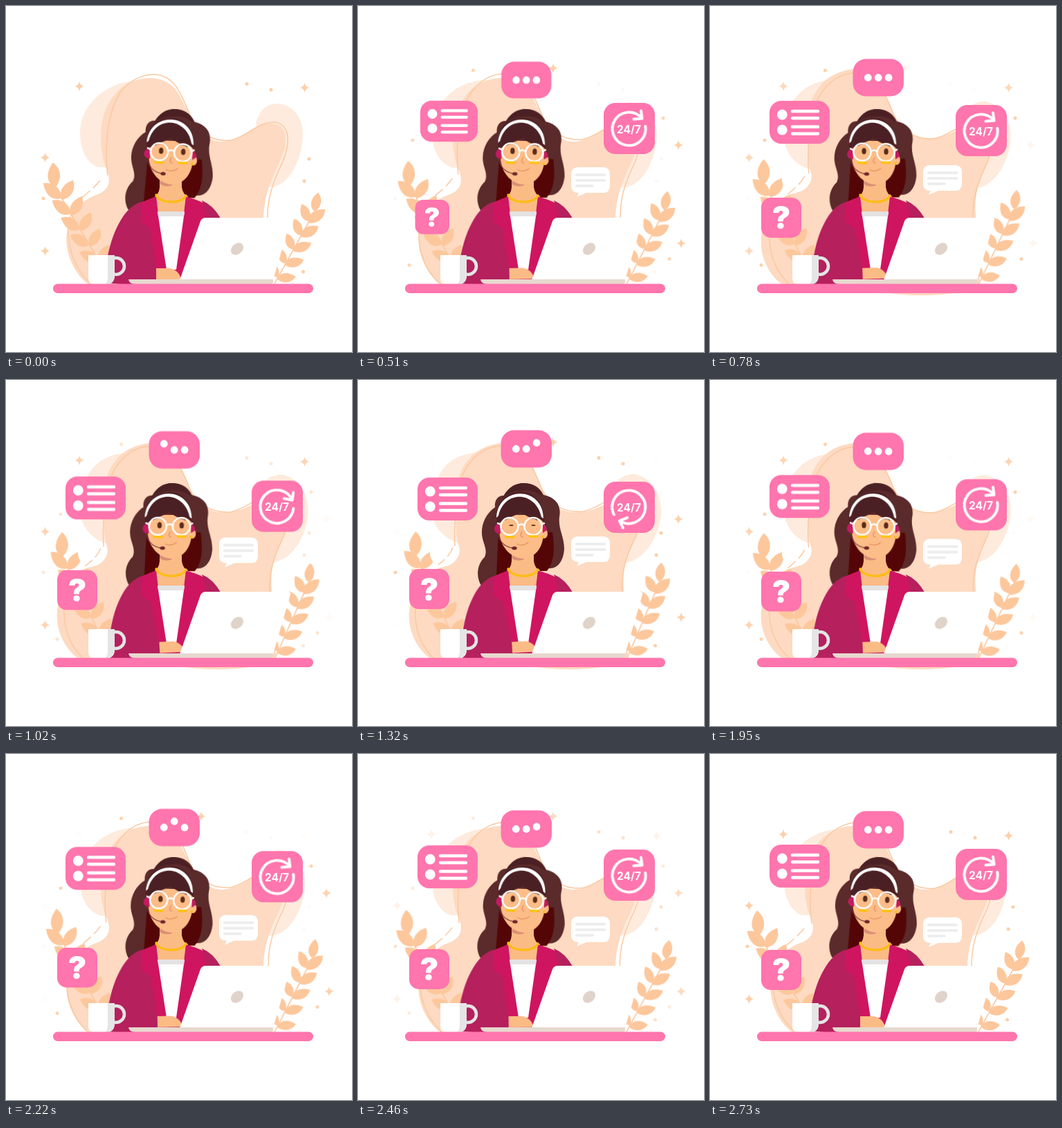
Animation of 500x500 px, one loop 2760 ms. Source, as an HTML page:

```html
<!DOCTYPE html>
<html lang="en">
<head>
<meta charset="utf-8">
<title>Support desk</title>
<style>
  html, body { margin: 0; width: 100%; height: 100%; overflow: hidden; background: #fff; }
  svg { display: block; width: 100vw; height: 100vh; }
  text { font-family: Inter, "Open Sans", sans-serif; text-anchor: middle; fill: #fff; }
  .line { fill: none; stroke-linecap: round; stroke-linejoin: round; }
  .white { stroke: #fff; }

  /* Slow sway: one pose at the loop ends, the other in the middle */
  .sway { animation: 1380ms cubic-bezier(.37, 0, .63, 1) infinite alternate; }
  .turn { animation-name: turn; transform-origin: var(--pivot); }
  .float { animation-name: float; }
  @keyframes turn { from { transform: rotate(var(--from)); } to { transform: rotate(var(--to)); } }
  @keyframes float { from { transform: none; } to { transform: translateY(var(--rise)); } }

  .blob { animation-name: blob; fill: #fddac1; }
  @keyframes blob {
    from { d: path("M137 190C137 140 165 106 205 104C245 104 250 130 262 150C285 200 310 205 345 185C375 163 402 165 404 190C407 220 372 250 372 310L372 400C360 403 240 403 215 403L120 403C95 385 84 350 88 327C92 300 108 282 128 274C147 268 152 257 147 240C140 225 137 210 137 190Z"); }
    to { d: path("M142 175C140 130 162 95 210 91C246 95 250 120 262 148C274 182 297 200 340 187C360 180 372 168 394 171C415 180 410 205 400 230C385 260 381 280 385 310L390 401C365 423 270 423 215 406L105 403C80 385 72 355 74 335C77 300 95 278 120 271C145 265 150 250 145 238C140 220 142 200 142 175Z"); }
  }
  .shade { fill: #feebdd; }
  .left { animation-name: shadeLeft; }
  @keyframes shadeLeft {
    from { d: path("M190 108C150 108 107 140 107 182C107 210 118 228 133 233L170 233Z"); }
    to { d: path("M190 104C130 102 108 132 107 188C107 210 122 228 145 236L180 236Z"); }
  }
  .right { animation-name: shadeRight; }
  @keyframes shadeRight {
    from { d: path("M361 170C366 148 380 140 395 141C420 145 430 168 429 187C428 220 410 262 380 262Z"); }
    to { d: path("M361 170C366 146 385 135 400 136C428 142 438 168 438 190C438 222 414 264 382 265Z"); }
  }
  .contour, .trail, .rim { fill: none; stroke: #fbc9a2; stroke-width: 1.5; }
  .contour { animation-name: contour; }
  @keyframes contour {
    from { d: path("M147 245C143 215 143 160 165 125C180 105 200 98 217 99C240 101 250 120 262 148C275 185 300 197 325 194C350 188 365 166 390 168C412 173 410 200 400 225C385 255 377 280 378 310"); }
    to { d: path("M140 240C138 215 143 165 150 140C165 105 190 95 210 95C238 97 250 120 262 148C272 180 298 192 325 190C350 184 355 172 380 170C410 175 411 200 402 225C385 260 380 280 382 310"); }
  }
  .trail { animation-name: trail; stroke-dasharray: 15 6; }
  @keyframes trail {
    from { d: path("M136 252C128 262 118 270 106 280"); }
    to { d: path("M137 242C133 254 124 260 116 267"); }
  }
  .rim { animation-name: rim; }
  @keyframes rim {
    from { d: path("M100 290C82 315 88 370 122 401"); }
    to { d: path("M100 284C74 320 78 370 108 401"); }
  }

  /* Twinkles: stars three times a loop, dots twice */
  .twinkle { animation: twinkle cubic-bezier(.37, 0, .63, 1) infinite alternate; fill: #fdcfaa; stroke: #fdcfaa; }
  .stars { animation-duration: 460ms; stroke: none; }
  .dots { animation-duration: 690ms; stroke-width: 5; stroke-linecap: round; }
  .late { animation-direction: alternate-reverse; }
  @keyframes twinkle { from { opacity: 1; } to { opacity: 0; } }

  .pop { animation: 2760ms cubic-bezier(.37, 0, .63, 1) infinite; transform-origin: var(--pivot); }
  @keyframes pop1 { 0% { transform: scale(0); } 18%, 100% { transform: none; } }
  @keyframes pop2 { 0%, 2% { transform: scale(0); } 20%, 100% { transform: none; } }
  @keyframes pop3 { 0%, 3% { transform: scale(0); } 21%, 100% { transform: none; } }
  @keyframes pop4 { 0%, 5% { transform: scale(0); } 23%, 100% { transform: none; } }

  .spin { animation: spin 2760ms cubic-bezier(.37, 0, .63, 1) infinite; }
  @keyframes spin { 0%, 32.6% { transform: none; } 65.2%, 100% { transform: rotate(360deg); } }

  .hop { animation: hop 2760ms cubic-bezier(.37, 0, .63, 1) var(--wait, 0ms) infinite; }
  @keyframes hop {
    0%, 31.5%, 42.4%, 70%, 81%, 100% { transform: none; }
    37%, 75.4% { transform: translateY(-9px); }
  }

  .blink { animation: blink 2760ms ease-in-out infinite; transform-origin: 0 210px; }
  @keyframes blink { 0%, 44.5%, 53.5%, 100% { transform: none; } 47.5%, 50.5% { transform: scaleY(.2); } }
</style>
</head>
<body>
<svg viewBox="0 0 500 500">
  <defs>
    <path id="star" d="M0 -7Q1.1 -1.1 7 0Q1.1 1.1 0 7Q-1.1 1.1 -7 0Q-1.1 -1.1 0 -7Z"/>
  </defs>

  <path class="sway shade left"/>
  <path class="sway shade right"/>
  <path class="sway blob"/>
  <path class="sway rim"/>

  <g class="twinkle stars">
    <use href="#star" x="106" y="116"/>
    <use href="#star" x="431.5" y="118"/>
    <use href="#star" x="56.5" y="219"/>
    <use href="#star" x="56.5" y="354"/>
  </g>
  <g class="twinkle stars late">
    <use href="#star" x="282" y="90"/>
    <use href="#star" x="463" y="201"/>
    <use href="#star" x="467" y="343"/>
  </g>
  <path class="twinkle dots" d="M348 112.5h0M383 121h0M438 221h0M431 253h0M429.5 384h0M54 278h0"/>
  <path class="twinkle dots late" d="M166.5 93h0M441 162h0M79 194h0M450 365.5h0M74 374.5h0"/>

  <g class="sway turn" id="plantLeft" fill="#fdc79c" stroke="#fdc79c" style="--pivot:150px 380px; --from:0deg; --to:5.7deg"/>
  <g class="sway turn" id="plantRight" fill="#fdc79c" stroke="#fdc79c" style="--pivot:390px 390px; --from:0deg; --to:-6deg"/>
  <ellipse cx="124" cy="251" rx="20" ry="18" fill="#fff"/>
  <path class="sway contour"/>
  <path class="sway trail"/>

  <!-- Back hair -->
  <g class="sway turn" style="--pivot:240px 262px; --from:2.7deg; --to:0deg">
    <path fill="#5b2a2a" d="M240 149C227 149 217 157 212 167C201 166 197 175 198 184C186 192 178 207 179 223C180 236 188 244 183 256C172 266 170 284 178 297L222 297V272H274C288 274 297 262 298 244C298 226 289 215 291 198C294 182 287 170 268 166C262 154 252 149 240 149Z"/>
    <path fill="#540606" d="M203 218L200 284H225L252 276H273C283 264 285 246 281 220Z"/>
  </g>

  <!-- Torso -->
  <path fill="#fbbb85" d="M222 245H254V262Q256 273 263 275V300H215V275Q221 272 222 262Z"/>
  <path fill="#cf1560" d="M217 275L190 286L205 395H258L310 307C303 294 288 283 259 275L246 340Z"/>
  <path fill="#b5205d" d="M283 281Q300 288 310 307L276 325L290 301Z"/>
  <path fill="#fbbb85" d="M217 275H260L257 300H220Z"/>
  <path fill="#fff" d="M219 297H258L246 381H232Z"/>
  <path fill="#e4e2e3" d="M219 297H258L257 304H220Z"/>
  <path class="line" stroke="#fdbd14" stroke-width="3.4" d="M217 273C222 286 254 287 260 274"/>

  <!-- Arm and hand -->
  <g class="sway turn" style="--pivot:212px 290px; --from:0deg; --to:-3.4deg">
    <path fill="#fbbb85" d="M212 379H236C245 380 251 386 253 395H212Z"/>
    <path fill="#b5205d" d="M196 283C172 288 151 328 145 374V400Q182 405 217 402V380L208 320L195 312Z"/>
  </g>

  <!-- Head -->
  <g class="sway turn" style="--pivot:240px 265px; --from:2.8deg; --to:0deg">
    <path fill="#d88d77" d="M222 247H252L238 260Q228 262 222 258Z"/>
    <ellipse cx="269" cy="222" rx="5" ry="7" fill="#fbbb85"/>
    <path fill="#fcbd88" d="M204 195H268V220C268 244 254 258 238 258C220 257 206 241 204 220Z"/>
    <path fill="#c51a61" d="M205 206Q197 209 197 216Q199 223 206 222ZM267 207Q273 211 273 217L267 221Z"/>
    <circle cx="267" cy="227" r="2" fill="#fdbd14"/>
    <path fill="#4b2024" d="M200 205C198 172 218 161 236 162C257 162 270 181 269 207C264 200 255 196 250 199C245 198 240 194 235 191C224 199 213 198 206 206Z"/>
    <path fill="#4b2024" d="M208 172C216 155 227 149 240 149C253 150 262 157 267 168Q252 157 236 160Q219 160 208 172Z"/>
    <path fill="#fff" d="M200 199C202 153 267 152 268 200L265 198C257 161 212 158 203 196Z"/>
    <path class="line" stroke="#4b2024" stroke-width="1.6" d="M212 202Q219 197 226 201M246 201Q253 198 259 202"/>
    <g class="blink" fill="#5a2c1b">
      <ellipse cx="221.5" cy="210" rx="3.2" ry="4.6"/>
      <ellipse cx="253.5" cy="210" rx="3.2" ry="4.6"/>
    </g>
    <g class="line white" stroke-width="2.4">
      <circle cx="219" cy="211.5" r="12.5"/>
      <circle cx="253" cy="211.5" r="12.5"/>
      <path d="M231.5 210Q236 207 240.5 210M206 209L202 207M265.5 209L269 207"/>
    </g>
    <path class="line" stroke="#ffc20e" stroke-width="3.6" d="M214 227H225M248 226H259"/>
    <path class="line" stroke="#e88d5d" stroke-width="1.3" d="M237 219Q233 226 238 227M230 237Q238 241 246 235"/>
    <path class="line" stroke="#71363a" stroke-width="1.3" d="M202 221C204 234 212 241 224 243"/>
    <ellipse cx="226" cy="243" rx="3.7" ry="2.5" fill="#71252f"/>
  </g>

  <!-- Laptop, mug, desk -->
  <path fill="#fff" d="M289 306H408Q412 306 411 310L386 396H251L281 311Q283 306 289 306Z"/>
  <ellipse cx="334" cy="351" rx="10" ry="7.6" fill="#e0d3ca" transform="rotate(-40 334 351)"/>
  <path fill="#e7d9cf" d="M177 395H386V399Q386 402 382 402H187Q178 402 177 395Z"/>
  <circle class="line" cx="159" cy="376" r="12" stroke="#e5e5e5" stroke-width="4.6"/>
  <path fill="#fff" d="M119 360H157V389Q157 402 145 402H127Q119 402 119 393Z"/>
  <path fill="#e5e5e5" d="M147 360H157V389Q157 402 144 402Q147 398 147 391Z"/>
  <rect x="68" y="401.5" width="376" height="13.5" rx="6.75" fill="#ff75ad"/>

  <!-- Bubbles -->
  <g class="sway float" style="--rise:-10px">
    <g class="pop" style="animation-name:pop1; --pivot:308px 279px">
      <path fill="#fff" d="M318 236H354Q364 236 364 246V263Q364 273 354 273H330L316 279L319 273Q308 273 308 263V246Q308 236 318 236Z"/>
      <path class="line" stroke="#ececec" stroke-width="3.4" d="M315.5 247H356.5M315.5 255H356.5M315.5 263H339"/>
    </g>
  </g>
  <g class="sway float" style="--rise:10px">
    <g class="pop" style="animation-name:pop1; --pivot:355px 211px">
      <rect x="355" y="137" width="74" height="74" rx="17" fill="#ff75ad"/>
      <g transform="translate(391.5 174)">
        <path class="line white spin" stroke-width="4" d="M23.8 -3.3A24 24 0 1 1 18 -15.5M17.5 -25.5L19 -14.5L7 -13.5"/>
        <text y="6.5" font-size="15.5" font-weight="700">24/7</text>
      </g>
    </g>
  </g>
  <g class="sway float" style="--rise:-10px">
    <g class="pop" style="animation-name:pop2; --pivot:243px 136.5px">
      <rect x="206.5" y="82.5" width="73.5" height="54" rx="19" fill="#ff75ad"/>
      <g fill="#fff">
        <circle class="hop" cx="228.3" cy="109.5" r="5.4"/>
        <circle class="hop" cx="243.2" cy="109.5" r="5.4" style="--wait:145ms"/>
        <circle class="hop" cx="258.1" cy="109.5" r="5.4" style="--wait:290ms"/>
      </g>
    </g>
  </g>
  <g class="sway float" style="--rise:10px">
    <g class="pop" style="animation-name:pop3; --pivot:173px 193px">
      <rect x="86" y="131" width="87" height="62" rx="17" fill="#ff75ad"/>
      <circle cx="104.3" cy="151" r="7.4" fill="#fff"/>
      <circle cx="104.3" cy="173" r="7.4" fill="#fff"/>
      <path class="line white" stroke-width="4.4" d="M119 146H156M119 156H156M119 168.5H156M119 178.5H156"/>
    </g>
  </g>
  <g class="sway float" style="--rise:-10px">
    <g class="pop" style="animation-name:pop4; --pivot:132px 283px">
      <rect x="74" y="283" width="58" height="58" rx="14" fill="#ff75ad"/>
      <text x="103" y="328.5" font-size="45" font-weight="900">?</text>
    </g>
  </g>
</svg>
<script>
  const LEAF = "M0 0C.2 -.34 .62 -.34 1 0C.72 .32 .28 .32 0 0Z";

  function addPath(parent, attributes) {
    const path = document.createElementNS("http://www.w3.org/2000/svg", "path");
    for (const name in attributes) path.setAttribute(name, attributes[name]);
    parent.append(path);
  }

  // A tip leaf, then pairs of leaves at even steps down a straight stem
  function grow({ id, tip, step, pairs, tipLeaf, leftLeaf, rightLeaf }) {
    const plant = document.getElementById(id);
    const at = i => [tip[0] + i * step[0], tip[1] + i * step[1]];
    const leaf = (i, { angle, bend = 0, size }) => addPath(plant, {
      d: LEAF, stroke: "none",
      transform: `translate(${at(i)}) rotate(${angle + bend * i}) scale(${size - i})`
    });
    addPath(plant, { d: `M${tip}L${at(pairs + .5)}`, "stroke-width": 1.6 });
    leaf(0, tipLeaf);
    for (let i = 1; i <= pairs; i++) {
      leaf(i - .3, leftLeaf);
      leaf(i - .2, rightLeaf);
    }
  }

  grow({
    id: "plantLeft", tip: [71, 262], step: [13.4, 22.5], pairs: 5,
    tipLeaf: { angle: -95, size: 36 },
    leftLeaf: { angle: -138, bend: -4, size: 35 },
    rightLeaf: { angle: -62, size: 33 }
  });
  grow({
    id: "plantRight", tip: [446, 297], step: [-11.3, 20.3], pairs: 5,
    tipLeaf: { angle: -80, size: 28 },
    leftLeaf: { angle: -114, size: 28 },
    rightLeaf: { angle: -45, bend: 8, size: 32 }
  });
</script>
</body>
</html>
```
